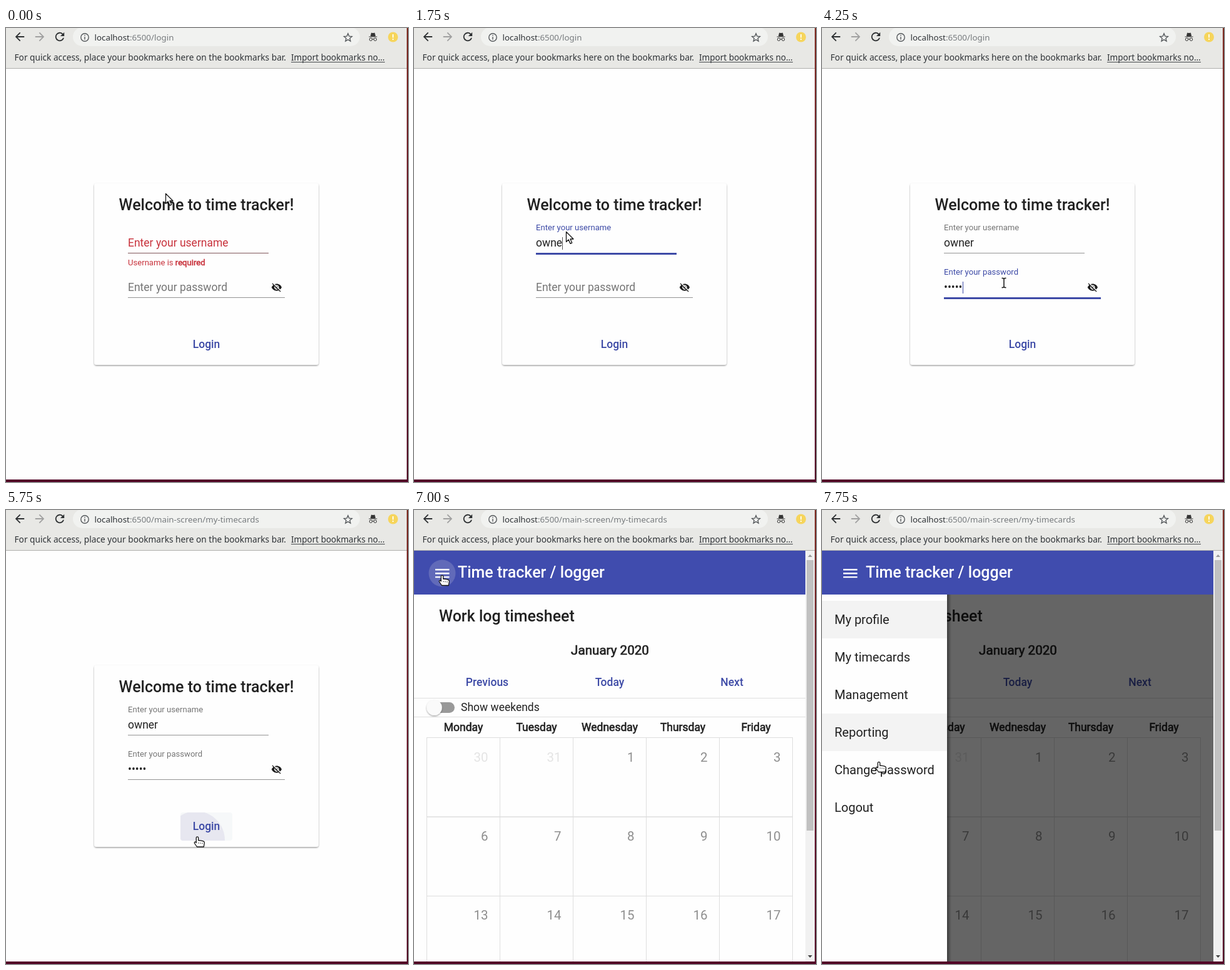
Animation, 643 px wide and 725 px high, one loop 8 s. Source, as an HTML page:

```html
<!DOCTYPE html>
<html lang="en">
<head>
<meta charset="utf-8">
<title>Time tracker login</title>
<style>
  html, body { margin: 0; width: 100%; height: 100%; overflow: hidden; background: #fefefe; }
  svg { display: block; width: 643px; height: 725px; }
  text { font-family: Roboto, sans-serif; font-size: 17.5px; fill: #212121; white-space: pre; }
  .ui text { font-family: "Noto Sans", sans-serif; font-size: 13.7px; fill: #2e3236; }
  .ui text.url { font-size: 13.35px; }
  .url tspan { fill: #777b7e; }
  .h1 { font-size: 25px; font-weight: 500; }
  .btn { font-weight: 500; fill: #3d4aa6; }
  .mid { text-anchor: middle; }
  .end { text-anchor: end; }
  .faux { stroke: #212121; stroke-width: .65px; }
  .err { font-size: 13.1px; fill: #c8323c; }
  .err tspan { stroke: #c8323c; stroke-width: .55px; }
  .num { font-size: 20.5px; fill: #8e8e8e; }
  .out { fill: #e4e4e4; }
  .item { font-size: 20px; }
  .rule { stroke: #dedede; fill: none; }
  .ptr { fill: #fff; stroke: #111; stroke-width: 1.3; stroke-linejoin: round; }
</style>
</head>
<body>
<svg viewBox="0 0 643 725">
  <defs>
    <linearGradient id="edge" x1="0" y1="0" x2="0" y2="1">
      <stop offset="0" stop-color="#7e2a20"/><stop offset=".3" stop-color="#70202a"/><stop offset="1" stop-color="#520326"/>
    </linearGradient>
    <linearGradient id="shade">
      <stop offset="0" stop-color="#000" stop-opacity=".4"/><stop offset="1" stop-color="#000" stop-opacity="0"/>
    </linearGradient>
    <filter id="soft" x="-10%" y="-10%" width="120%" height="120%">
      <feDropShadow dx="0" dy="1.3" stdDeviation="1.1" flood-opacity=".4"/>
    </filter>
    <clipPath id="btnBox"><rect x="279" y="483" width="83" height="45" rx="4"/></clipPath>
    <clipPath id="view"><rect y="65" width="641" height="656"/></clipPath>
    <path id="back" d="M20 11H7.83l5.59-5.59L12 4l-8 8 8 8 1.41-1.41L7.83 13H20z"/>
  </defs>

  <rect width="643" height="725" fill="#fefefe"/>

  <g clip-path="url(#view)">
    <g data-on="0-6000">
      <rect x="141" y="248" width="359" height="290" rx="4" fill="#fefefe" filter="url(#soft)"/>
      <text class="h1 mid" x="320.5" y="291">Welcome to time tracker!</text>

      <text id="userLabel" x="195">Enter your username</text>
      <text id="user" x="195" y="349"></text>
      <rect id="userLine" x="195" width="225"/>
      <rect id="userCaret" y="334" width="1" height="20" fill="#555"/>
      <text class="err" x="195" y="379" data-on="0-1250">Username is <tspan>required</tspan></text>

      <text id="passLabel" x="195">Enter your password</text>
      <text id="pass" x="195" y="420"></text>
      <rect id="passLine" x="195" width="251"/>
      <rect id="passCaret" y="405" width="1" height="19" fill="#3d4aa6"/>
      <path transform="translate(424 405.2) scale(.74)" fill="#1c1c1c" d="M12 7c2.76 0 5 2.24 5 5 0 .65-.13 1.26-.36 1.83l2.92 2.92c1.51-1.26 2.7-2.89 3.43-4.75-1.73-4.39-6-7.5-11-7.5-1.4 0-2.74.25-3.98.7l2.16 2.16C10.74 7.13 11.35 7 12 7zM2 4.27l2.28 2.28.46.46C3.08 8.3 1.78 10.02 1 12c1.73 4.39 6 7.5 11 7.5 1.55 0 3.03-.3 4.38-.84l.42.42L19.73 22 21 20.73 3.27 3 2 4.27zM7.53 9.8l1.55 1.55c-.05.21-.08.43-.08.65 0 1.66 1.34 3 3 3 .22 0 .44-.03.65-.08l1.55 1.55c-.67.33-1.41.53-2.2.53-2.76 0-5-2.24-5-5 0-.79.2-1.53.53-2.2zm4.31-.78l3.15 3.15.02-.16c0-1.66-1.34-3-3-3l-.17.01z"/>

      <g clip-path="url(#btnBox)" data-on="5250-6000">
        <rect x="279" y="483" width="83" height="45" fill="#f6f8f9"/>
        <circle cx="304" cy="527" r="46" fill="#e7e7f0" data-on="5750-6000"/>
      </g>
      <text class="btn mid" x="320.5" y="511">Login</text>
    </g>

    <g data-on="6000-8000">
      <text class="h1" x="40" y="178">Work log timesheet</text>
      <text class="mid faux" x="313.5" y="231" style="font-size:20.6px">January 2020</text>
      <text class="btn mid" x="117" y="281">Previous</text>
      <text class="btn mid" x="313" y="281">Today</text>
      <text class="btn mid" x="508.500" y="281">Next</text>
      <path class="rule" d="M0 300.500H626M0 330.500H626"/>
      <rect x="28" y="307" width="37" height="17" rx="8.500" fill="#999"/>
      <circle cx="32.500" cy="315.500" r="12.300" fill="#fafafa" filter="url(#soft)"/>
      <text x="75" y="321">Show weekends</text>
      <g id="calendar"></g>

      <g data-on="7250-8000">
        <rect y="135" width="626" height="586" fill="#000" opacity=".6"/>
        <rect x="200" y="135" width="7" height="586" fill="url(#shade)" data-on="7500-8000"/>
        <rect y="135" width="200" height="586" fill="#fefefe"/>
        <rect y="145" width="200" height="60" fill="#f3f3f3"/>
        <rect y="325" width="200" height="60" fill="#f3f3f3" data-on="7500-8000"/>
        <g id="menu"></g>
      </g>

      <rect y="65" width="626" height="70" fill="#404cae"/>
      <circle cx="45" cy="101" r="21.500" fill="#616ab9" data-on="7000-7500"/>
      <path d="M34 95.300H56.500M34 101.200H56.500M34 107.100H56.500" stroke="#fff" stroke-width="2.400"/>
      <text class="h1" x="70" y="108" style="fill:#fff">Time tracker / logger</text>

      <rect x="626" y="65" width="15" height="656" fill="#f1f1f1"/>
      <rect x="628" y="80" width="11" height="432" fill="#c1c1c1"/>
      <path d="M630 75l3.500-4 3.500 4z" fill="#999"/>
      <path d="M630 711l3.500 4 3.500-4z" fill="#444"/>
    </g>
  </g>

  <g class="ui">
    <rect width="641" height="65" fill="#e8e8e5"/>
    <rect y="64" width="641" height="1" fill="#aeaeac"/>
    <rect x="107" y="-1" width="459" height="30" rx="15" fill="#f1f2f0"/>
    <use href="#back" transform="translate(11.200 3.200) scale(.9)" fill="#2c2f31"/>
    <use href="#back" transform="translate(64.800 3.200) scale(-.9 .9)" fill="#a0a0a0"/>
    <path transform="translate(75.200 3.200) scale(.9)" fill="#2c2f31" d="M17.650 6.350A8 8 0 1 0 19.730 14h-2.080A6 6 0 1 1 16.220 7.780L13 11h7V4z"/>
    <g fill="none" stroke="#55595c" stroke-width="1.400">
      <circle cx="126" cy="15" r="6.200"/>
      <path d="M126 14v4.500M126 11v1.600"/>
      <path d="M547 8.800l1.800 4.300 4.600.4-3.500 3 1.100 4.500-4-2.400-4 2.400 1.100-4.500-3.500-3 4.600-.4z"/>
    </g>
    <path d="M580.500 14h13M583.500 13l1-5 2.500.7 2.500-.7 1 5z" fill="#333" stroke="#333"/>
    <path d="M585.700 18q1.300-1 2.600 0" fill="none" stroke="#333"/>
    <circle cx="583.500" cy="18.200" r="2.200" fill="none" stroke="#333"/>
    <circle cx="590.500" cy="18.200" r="2.200" fill="none" stroke="#333"/>
    <circle cx="619" cy="14.500" r="8" fill="#f6d55c"/>
    <path d="M619 10v5.500M619 17v2" stroke="#fffbe8" stroke-width="2"/>
    <text class="url" x="141.500" y="20">localhost<tspan id="path"></tspan></text>
    <text x="13.500" y="52">For quick access, place your bookmarks here on the bookmarks bar.</text>
    <text x="456" y="52" style="font-size:13.500px">Import bookmarks no…</text>
    <path d="M456 54.500H606" stroke="#44484b"/>
  </g>

  <g id="cursor">
    <path id="arrow" class="ptr" d="M.500.500V16.500L4.200 13 7 19.300 9.700 18.100 7 12H12z"/>
    <g id="beam" fill="none">
      <path d="M-3.500-7.500H-1.500L0-6.700 1.500-7.500H3.500M0-7V7M-3.500 7.500H-1.500L0 6.700 1.500 7.500H3.500" stroke="#fff" stroke-width="3.600"/>
      <path d="M-3.500-7.500H-1.500L0-6.700 1.500-7.500H3.500M0-7V7M-3.500 7.500H-1.500L0 6.700 1.500 7.500H3.500" stroke="#111" stroke-width="1.500"/>
    </g>
    <g id="hand" class="ptr">
      <path d="M-1.700 1.800C-1.600-.200 1.500-.200 1.700 1.800V6L5 6.300 8 6.800 10.500 7.800Q11.500 8.500 11.300 10.500L10.300 16.500H-.500L-4.600 10.500C-5.200 8.800-3.500 8-2.500 9L-1.700 9.800z"/>
      <path d="M2 9.500v1.500M5 9.700v1.500M8 10v1.500" stroke-width="1"/>
    </g>
  </g>

  <rect x="641" width="2" height="725" fill="url(#edge)"/>
  <rect y="721" width="643" height="4" fill="#520326"/>
</svg>

<script>
const LOOP = 8000;
const $ = id => document.getElementById(id);
const RED = '#c8323c', BLUE = '#3d4aa6', GREY = '#757575', LINE = '#949494';

// Static lists
function add(parent, tag, attrs, text = '') {
  const el = document.createElementNS('http://www.w3.org/2000/svg', tag);
  for (const name in attrs) el.setAttribute(name, attrs[name]);
  el.textContent = text;
  parent.append(el);
}

const calendar = $('calendar');
['Monday', 'Tuesday', 'Wednesday', 'Thursday', 'Friday'].forEach((day, col) => {
  add(calendar, 'text', { class: 'mid faux', x: 79 + 117 * col, y: 353 }, day);
  for (let row = 0; row < 3; row++) {
    const n = 30 + col + 7 * row, out = n < 32;
    add(calendar, 'text', { class: out ? 'num end out' : 'num end', x: 118.5 + 117 * col, y: 402 + 126 * row },
      out ? n : n - 31);
    add(calendar, 'rect', { class: 'rule', x: 20.5 + 117 * col, y: 363.5 + 126.5 * row, width: 117, height: 126.5 });
  }
});

['My profile', 'My timecards', 'Management', 'Reporting', 'Change password', 'Logout'].forEach((name, i) =>
  add($('menu'), 'text', { class: 'item', x: 20, y: 182 + 60 * i }, name));

// Stepped tracks: [start time, value...]
const tracks = {
  cursor: [
    [0, 'arrow', 255, 264], [250, 'arrow', 251, 288], [500, 'arrow', 243, 325],
    [2750, 'beam', 246, 328], [3000, 'arrow', 266, 368], [3250, 'beam', 291, 407],
    [5000, 'arrow', 296, 452], [5250, 'hand', 304, 508], [5500, 'hand', 306, 521.5],
    [6000, 'arrow', 304, 515], [6250, 'arrow', 250, 420], [6500, 'arrow', 150, 250],
    [6750, 'arrow', 66, 132], [7000, 'hand', 45, 104], [7500, 'hand', 82, 340], [7750, 'hand', 91, 402]
  ],
  userLabel: [[0, false, RED], [750, true, RED], [1250, true, BLUE], [3500, true, GREY]],
  userLine: [[0, 1, '#80565a'], [750, 3, RED], [1250, 3, '#87407a'], [1500, 3, BLUE], [3500, 1, LINE]],
  userCaret: [[0, false], [750, true], [2750, false]],
  user: [[0, 0], [1250, 1], [1500, 2], [1750, 4], [2000, 5]],
  passLabel: [[0, false, GREY], [3500, true, BLUE], [5500, true, GREY]],
  passLine: [[0, 1, LINE], [3500, 3, BLUE], [5500, 1, LINE]],
  passCaret: [[0, false], [3500, true], [5000, false]],
  pass: [[0, 0], [3750, 2], [4250, 5]],
  path: [[0, ':6500/login'], [5750, ':6500/main-screen/my-timecards']]
};

const at = (name, t) => tracks[name].findLast(key => key[0] <= t).slice(1);
const show = (el, on) => { el.style.display = on ? '' : 'none'; };

function field(name, value, base, t) {
  const [floating, color] = at(name + 'Label', t);
  const label = $(name + 'Label');
  label.setAttribute('y', floating ? base - 26 : base);
  label.style.fontSize = floating ? '13.1px' : '17.5px';
  label.style.fill = color;

  const [height, lineColor] = at(name + 'Line', t);
  const line = $(name + 'Line');
  line.setAttribute('y', base + 10);
  line.setAttribute('height', height);
  line.setAttribute('fill', lineColor);

  const text = $(name), caret = $(name + 'Caret');
  text.textContent = value.slice(0, at(name, t)[0]);
  caret.setAttribute('x', Math.round(195 + (text.textContent ? text.getComputedTextLength() : 0)));
  show(caret, at(name + 'Caret', t)[0]);
}

const timed = [...document.querySelectorAll('[data-on]')].map(el => [el, ...el.dataset.on.split('-').map(Number)]);

function draw() {
  const t = performance.now() % LOOP;
  for (const [el, from, to] of timed) show(el, t >= from && t < to);
  field('user', 'owner', 349, t);
  field('pass', '•••••', 420, t);
  $('path').textContent = at('path', t)[0];
  const [shape, x, y] = at('cursor', t);
  for (const id of ['arrow', 'beam', 'hand']) show($(id), id === shape);
  $('cursor').setAttribute('transform', `translate(${x} ${y})`);
  requestAnimationFrame(draw);
}
draw();
</script>
</body>
</html>
```
